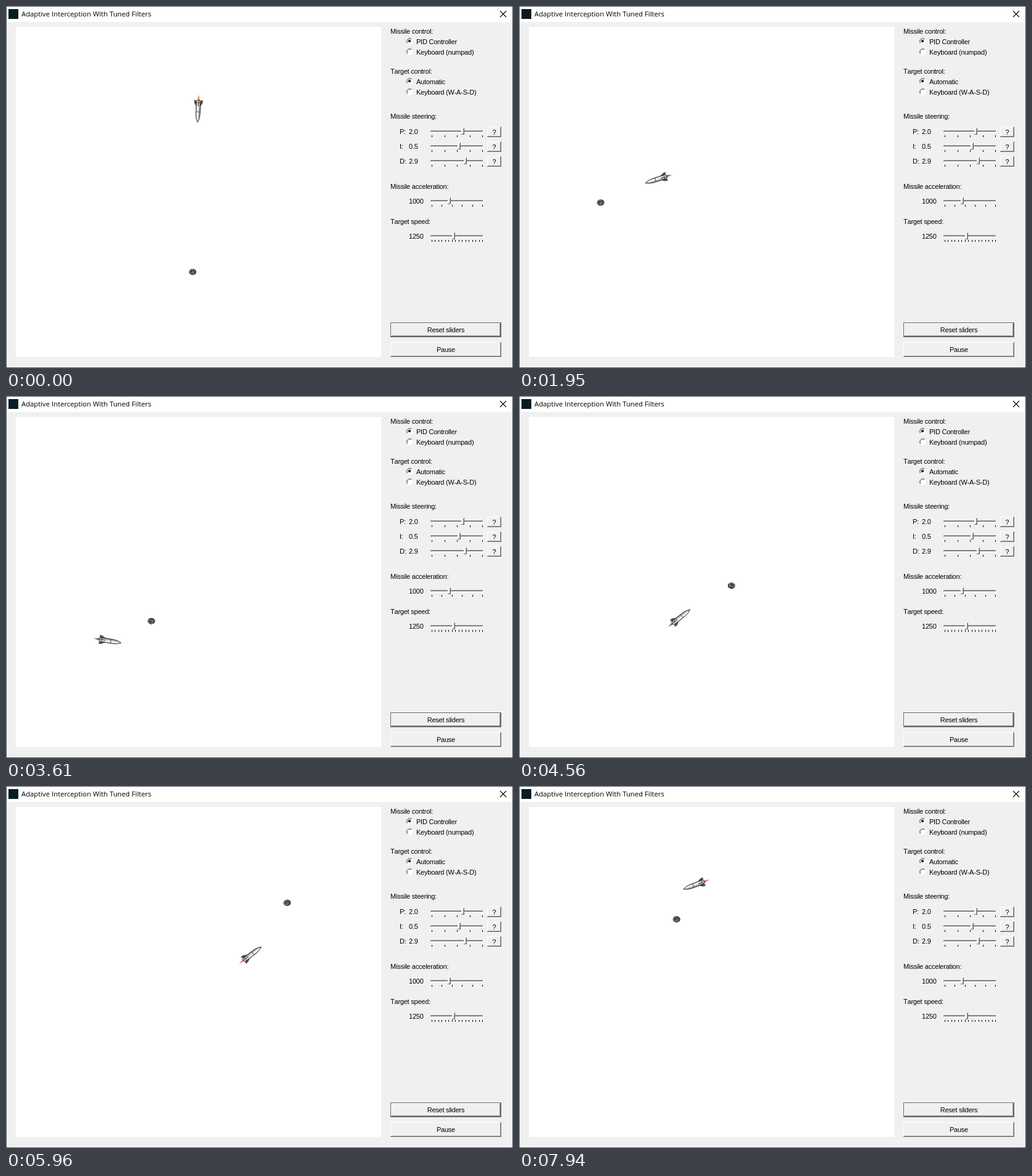
An HTML page that plays this animation: 823 px wide and 588 px high, repeating every 8 s.

```html
<!DOCTYPE html>
<html lang="en">
<head>
<meta charset="utf-8">
<title>Adaptive Interception With Tuned Filters</title>
<style>
  html, body { margin: 0; width: 100%; height: 100%; overflow: hidden; background: #f0f0f0; }
  svg { display: block; width: 823px; height: 588px; }
  text { font: 11px "Liberation Sans", Arial, sans-serif; letter-spacing: -.23px; font-kerning: none; }
  .title { font: 11.3px "Open Sans", "Noto Sans", sans-serif; letter-spacing: 0; }
  #ui rect { shape-rendering: crispEdges; }
</style>
</head>
<body>
<svg viewBox="0 0 823 588">
  <defs>
    <linearGradient id="metal" x1="0" y1="0" x2="0" y2="1">
      <stop offset="0" stop-color="#777"/><stop offset=".45" stop-color="#ddd"/>
      <stop offset=".7" stop-color="#fff"/><stop offset="1" stop-color="#a8a8a8"/>
    </linearGradient>
  </defs>
  <g id="ui"></g>
  <g id="target"><circle r="6" fill="#333"/></g>
  <g id="missile">
    <path id="flame" d="M-13-2 L-23 0 L-13 2Z"/>
    <path d="M-4-3 L-10-6.5 H-14 L-12-3Z M-4 3 L-10 6.5 H-14 L-12 3Z" fill="#555" stroke="#222" stroke-width=".7"/>
    <path d="M-14-2.5 L-11-3.4 H9 Q17-3 22 0 Q17 3 9 3.4 H-11 L-14 2.5Z" fill="url(#metal)" stroke="#222" stroke-width=".9"/>
    <path d="M-10-3 V3 M5-3 V3" stroke="#444" stroke-width=".9"/>
    <path d="M-13 0 H-4" stroke="#444" stroke-width="1.2"/>
  </g>
</svg>
<script>
const LOOP = 8000, STEP = 50, KEY_GAP = 500;
const byId = id => document.getElementById(id);
const ui = byId('ui'), target = byId('target');

function add(parent, tag, attrs, content = '') {
  const node = document.createElementNS('http://www.w3.org/2000/svg', tag);
  for (const key in attrs) node.setAttribute(key, attrs[key]);
  node.textContent = content;
  parent.append(node);
}
const box = (x, y, width, height, fill) => add(ui, 'rect', { x, y, width, height, fill });
const label = (x, y, content, extra = {}) => add(ui, 'text', { x, y, ...extra }, content);

function bevel(x, y, w, h) {
  box(x, y, w, h, '#696969');
  box(x, y, w - 1, h - 1, '#fff');
  box(x + 1, y + 1, w - 2, h - 2, '#a0a0a0');
  box(x + 1, y + 1, w - 3, h - 3, '#f0f0f0');
}
function button(x, y, w, h, content, isDefault) {
  if (isDefault) {
    box(x, y, w, h, '#646464');
    bevel(x + 1, y + 1, w - 2, h - 2);
  } else bevel(x, y, w, h);
  label(x + w / 2, y + h / 2 + 4, content, { 'text-anchor': 'middle' });
}
function radio(y, content, checked) {
  const arc = (r, stroke) => add(ui, 'path', {
    d: `M${655 - .7 * r} ${y + .7 * r} A${r} ${r} 0 0 1 ${655 + .7 * r} ${y - .7 * r}`, stroke, fill: 'none'
  });
  add(ui, 'circle', { cx: 655, cy: y, r: 5.7, fill: '#fff' });
  arc(5.4, '#999');
  arc(4.4, '#606060');
  if (checked) add(ui, 'circle', { cx: 655, cy: y, r: 2.1 });
  label(666, y + 5, content);
}
function radioPair(y, title, first, second) {
  label(624, y, title);
  radio(y + 12, first, true);
  radio(y + 29, second);
}
function slider(y, value, thumb, intervals) {
  label(654, y + 5, value);
  box(689, y - 1, 86, 4, '#fff');
  box(689, y - 1, 85, 3, '#a0a0a0');
  box(690, y, 84, 2, '#e3e3e3');
  box(690, y, 84, 1, '#696969');
  for (let i = 0; i <= intervals; i++) box(Math.round(691 + 82 * i / intervals), y + 7, 1, 3, '#000');
  box(thumb - 2, y - 5, 5, 11, '#696969');
  box(thumb - 2, y - 5, 4, 10, '#fff');
  box(thumb - 1, y - 4, 2, 9, '#f0f0f0');
  box(thumb + 1, y - 4, 1, 9, '#a0a0a0');
}
function gainRow(y, name, value, thumb) {
  label(639, y + 5, name);
  slider(y, value, thumb, 4);
  button(781, y - 7, 23, 17, '?');
}

box(0, 0, 823, 588, '#4c5559');
box(1, 1, 821, 586, '#f0f0f0');
box(1, 1, 821, 25, '#fff');
box(4, 5, 16, 16, '#081c24');
label(25, 17, 'Adaptive Interception With Tuned Filters', { class: 'title' });
add(ui, 'path', { d: 'M802 8 L812 18 M812 8 L802 18', stroke: '#000', 'stroke-width': 1.1 });
box(16, 34, 593, 536, '#fff');

radioPair(45, 'Missile control:', 'PID Controller', 'Keyboard (numpad)');
radioPair(110, 'Target control:', 'Automatic', 'Keyboard (W-A-S-D)');
label(624, 183, 'Missile steering:');
gainRow(203, 'P:', '2.0', 741);
gainRow(227, 'I:', '0.5', 735);
gainRow(251, 'D:', '2.9', 745);
label(624, 297, 'Missile acceleration:');
slider(316, '1000', 719, 5);
label(624, 354, 'Target speed:');
slider(373, '1250', 726, 15);
button(624, 514, 180, 24, 'Reset sliders', true);
button(624, 546, 180, 24, 'Pause');

// Light specks on the rock, from a small seeded generator.
let seed = 7;
const random = () => (seed = seed * 16807 % 2147483647) / 2147483647;
for (let i = 0; i < 16; i++) {
  const angle = i * 2.4, r = 5.2 * Math.sqrt(random());
  add(target, 'circle', {
    cx: r * Math.cos(angle), cy: r * Math.sin(angle), r: .8, fill: i % 3 ? '#808080' : '#ddd'
  });
}

// Key points, KEY_GAP apart in time
const targetPath = [
  [303, 432], [265, 380], [243, 313], [187, 290], [129, 324], [129, 385], [180, 422], [227, 376], [273, 325],
  [338, 309], [408, 301], [458, 255], [453, 185], [382, 175], [303, 160], [249, 163], [258, 226]
];
const missilePath = [
  [312, 167], [311, 189], [304, 224], [278, 263], [220, 283], [155, 308], [136, 362], [156, 395], [212, 394],
  [256, 364], [299, 329], [350, 297], [401, 271], [431, 220], [388, 171], [339, 153], [277, 165], [248, 210]
];

// Position and direction on a Catmull-Rom curve
function follow(path, time) {
  const index = Math.floor(time / KEY_GAP), u = time / KEY_GAP - index;
  const [p, a, b, q] = [-1, 0, 1, 2].map(k => path[Math.max(0, Math.min(path.length - 1, index + k))]);
  const axis = i => {
    const c1 = (b[i] - p[i]) / 2;
    const c2 = p[i] - 2.5 * a[i] + 2 * b[i] - q[i] / 2;
    const c3 = (q[i] - p[i] + 3 * (a[i] - b[i])) / 2;
    return { at: a[i] + u * (c1 + u * (c2 + u * c3)), slope: c1 + u * (2 * c2 + 3 * u * c3) };
  };
  const x = axis(0), y = axis(1);
  return { place: `translate(${x.at} ${y.at})`, heading: Math.atan2(y.slope, x.slope) * 180 / Math.PI };
}

function draw(elapsed) {
  const time = Math.floor(elapsed % LOOP / STEP) * STEP;
  const missile = follow(missilePath, time);
  target.setAttribute('transform', `${follow(targetPath, time).place} scale(1 .85) rotate(${time * .18})`);
  byId('missile').setAttribute('transform', `${missile.place} rotate(${missile.heading})`);
  byId('flame').setAttribute('fill', time < 900 ? '#e08a28' : time < 5080 ? '#666' : '#d9705f');
}

const start = performance.now();
function tick() {
  draw(performance.now() - start);
  requestAnimationFrame(tick);
}
tick();
</script>
</body>
</html>
```
